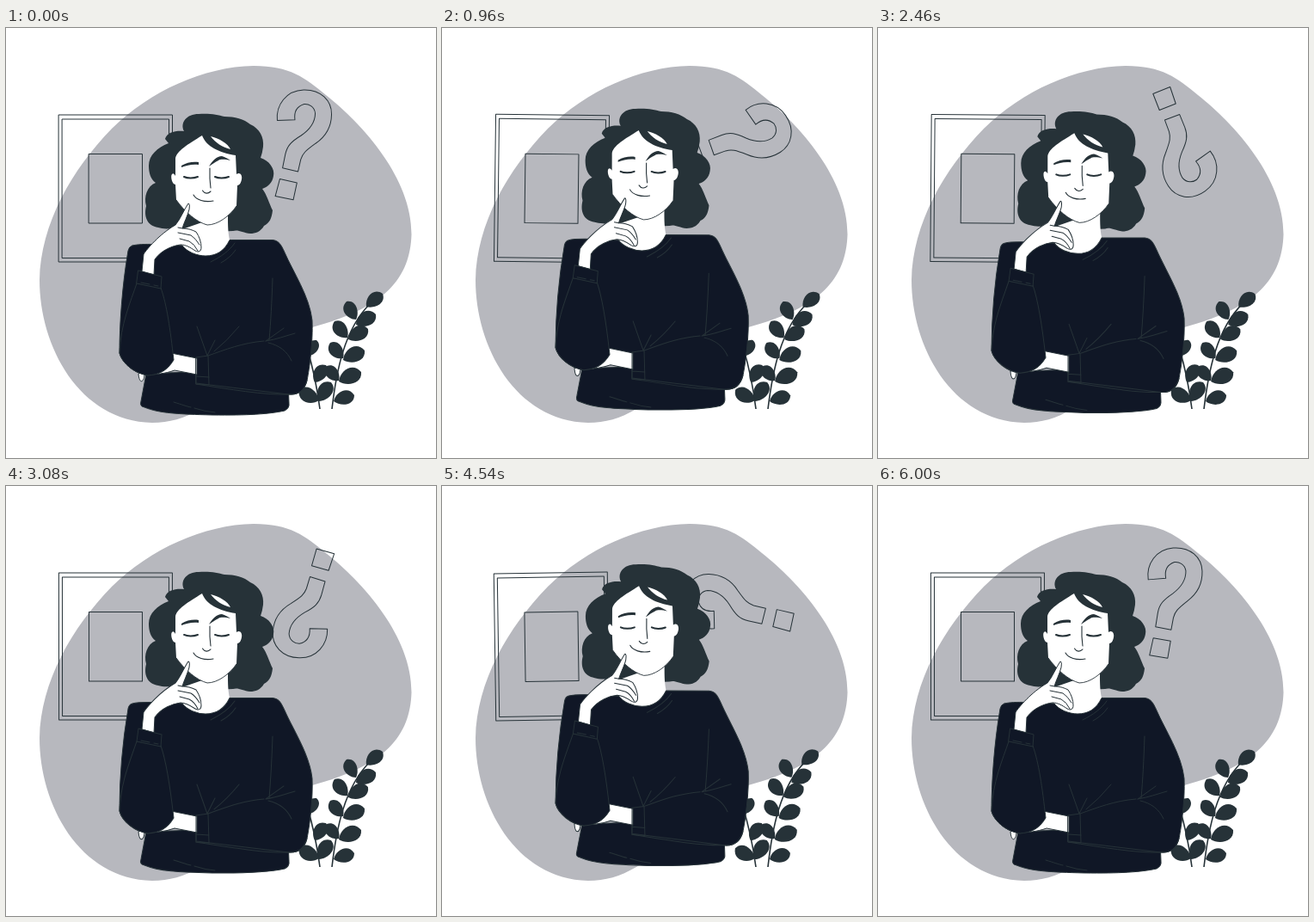
An HTML page with a canvas for the animation above (6.04 s loop, 500 by 500 pixels).

```html
<!DOCTYPE html>
<html lang="en">
<head>
<meta charset="utf-8">
<title>Thinking</title>
<style>
html, body { margin: 0; width: 100%; height: 100%; overflow: hidden; background: #fff; }
canvas { display: block; width: 500px; height: 500px; }
</style>
</head>
<body>
<canvas id="stage"></canvas>
<script>
const LOOP = 6040, STEPS = 145, TAU = Math.PI * 2;
const GREY = '#b7b8be', SLATE = '#263238', NAVY = '#101726', WHITE = '#fff';

const canvas = document.getElementById('stage');
const ctx = canvas.getContext('2d');
const ratio = window.devicePixelRatio || 1;
canvas.width = canvas.height = 500 * ratio;

const p = d => new Path2D(d);

const blob = p('M288 44C330 44 348 58 372 78C415 112 472 175 471.5 240C470 290 442 325 356 348C300 362 270 420 226 443C207 454 190 459 170 459C85 457 39 370 39 293C40 228 77 164 123 117C168 73 230 45 288 44Z');

const question = p('M322 163L325 147C327 137 332 132 343 125C353 118 359 109 359 99C358 91 351 88 346 88.5C338 91 334 97 335.5 107L315 108C313 90 325 73 345 72C365 71 378 84 378 100C378 117 370 127 360 134C348 143 345 146 343 153L340 167ZM319 176L339 180L335 200L314 196Z');

const hair = p('M207 120C202 110 210 100 224 100C237 99 246 101 254 103C266 103 277 106 284 112C295 117 300 127 299 138Q298 146 296 151C306 154 313 164 311 172C310 180 304 185 298 187C303 193 306 204 310 212C309 222 306 227 300 230C296 237 290 239 284 239C275 238 270 234 264 236L220 238L200 231C192 234 183 234 177 232C164 230 160 219 163 207C160 196 164 184 174 180C168 176 166 168 166 160C166 148 176 139 189 134L185 129C187 121 198 119 207 120Z');
const neck = p('M228 226L258 217C258 230 258 240 261 250C252 262 242 266 230 265C218 264 209 260 205 253L205 234Z');
const face = p('M197 152C198 143 212 135 228 125C233 138 248 145 267 148L268 170C272 167 275 171 274 176C273 181 271 183 269 183L268 207C260 219 246 229 234 229C222 226 208 214 198 200L197 182C193 182 191 172 193 170Q195 168 197 172Z');
const jaw = p('M198 200C208 214 222 226 234 229C246 229 260 219 268 207');
const parting = p('M238 126C247 128 258 134 261 141C252 139 243 133 238 126Z');
const brows = p('M204 160C210 156 218 155 224 156L224 159C216 158 210 160 204 162ZM236 161C240 154 245 149 251 149C255 150 258 152 261 154C256 153 250 152 247 154C243 156 240 158 236 161Z');
const eyes = p('M207 173C211 175 218 175 223 173M243 173C247 175 254 175 259 173');
const features = p('M237 163Q236.5 175 238 186M228.5 189C231 193 235 193 238 190M218 194C221 200 231 203 241 201');

const torso = p('M147 253C158 250 185 252 205 253C210 260 222 265 232 265C245 265 254 259 260 246.5L310 246.5C317 247 320 252 324 261C334 284 353 312 356 340C357 365 353 395 350 410C347 422 340 427 328 426L221 413L221 385L165 404C150 402 135 390 132 378C132 345 135 300 142 259Q143 254 147 253Z');
const hem = p('M163 402L157 434Q155 440 161 441C178 448 200 449 240 450C280 450.5 306 449 324 445Q330 442 329 436L328 410L221 400Z');
const wrist = p('M192 378L222 384L222 403L196 398C185 402 174 403 161 403C160 413 155 414 154 402L180 390Z');
const arm = p('M152 297L180 302C187 322 191 350 195 386C187 399 178 403 165 404C150 402 135 390 132 378C133 345 145 318 152 297Z');
const cuff = p('M154 282L181 289L180 303L152 297Z');
const cuffLines = p('M157 296L167 298M172 299L177 300M221 383L235 381L236 415L221 414ZM221 405L236 406');
const forearm = p('M235 381C255 374 275 366 300 364M221 414C260 420 300 427 328 426C340 427 347 422 350 410');
const creases = p('M310 291C309 320 308 340 306 363M302 364L323 349M302 364C315 362 325 358 336 355M305 366C318 369 327 376 332 387M222 347L234 381L243 363M242 376Q257 364 271 347M238 272C250 266 260 259 266 250M250 273Q261 267 267 258M195 435C205 438 210 440 215 441M219 442Q231 446 243 447');

const hand = p('M158 283L160 263C164 257 178 240 197 229C203 222 207 211 212 204Q214 204 213 211C211 219 207 226 205 233C212 233 217 235 221 237C225 243 227 249 227 255C227 260 224 261 220 259C214 255 209 252 203 252C194 253 181 258 173 269L172 287Z');
const fingers = p('M205 233L200 232M200 238L215 241Q220 244 225 252M202 245L213 248Q219 251 223 259');

const leafShape = p('M0 0C.22 -.4 .85 -.52 1 0C.85 .48 .22 .32 0 0Z');
const stems = p('M379 443C384 400 393 350 424 320M365 443C362 420 357 395 350 372');
// base x, base y, tip x, tip y
const leaves = [
  [419, 324, 438, 309], [407, 339, 396, 318], [407, 345, 430, 333],
  [397, 360, 382, 341], [398, 362, 421, 350], [392, 384, 377, 366],
  [392, 386, 417, 375], [387, 410, 373, 393], [387, 411, 413, 400],
  [381, 434, 405, 427], [364, 434, 378, 412], [359, 412, 372, 392],
  [364, 433, 341, 421], [353, 381, 361, 363]
];

function fill(path, color) {
  ctx.fillStyle = color;
  ctx.fill(path);
}

function line(path, width = 1) {
  ctx.strokeStyle = SLATE;
  ctx.lineWidth = width;
  ctx.stroke(path);
}

function shape(path, color, width = 1) {
  fill(path, color);
  line(path, width);
}

// Run draw() inside a rotation about (x, y), lifted by dy
function posed(x, y, angle, dy, draw) {
  ctx.save();
  ctx.translate(x, y + dy);
  ctx.rotate(angle);
  ctx.translate(-x, -y);
  draw();
  ctx.restore();
}

function drawPicture() {
  ctx.strokeStyle = SLATE;
  ctx.lineWidth = 1;
  ctx.strokeRect(61.5, 101, 132, 171);
  ctx.strokeRect(65.5, 106, 124, 161.5);
  ctx.strokeRect(96.5, 146.5, 62, 80.5);
}

function drawPlant() {
  line(stems, 1.6);
  for (const [x, y, tx, ty] of leaves) {
    const size = Math.hypot(tx - x, ty - y);
    ctx.save();
    ctx.translate(x, y);
    ctx.rotate(Math.atan2(ty - y, tx - x));
    ctx.scale(size, size);
    fill(leafShape, SLATE);
    ctx.restore();
  }
}

function drawWoman() {
  fill(hair, SLATE);
  fill(neck, WHITE);
  fill(face, WHITE);
  line(jaw, 0.9);
  fill(parting, WHITE);
  fill(brows, SLATE);
  line(eyes, 2);
  line(features, 1.1);
  shape(hem, NAVY);
  shape(torso, NAVY);
  shape(wrist, WHITE);
  shape(hand, WHITE);
  line(fingers);
  shape(arm, NAVY);
  shape(cuff, NAVY);
  line(cuffLines);
  line(forearm);
  line(creases);
}

function draw(phase) {
  const turn = phase * TAU;
  const sway = Math.sin(turn);
  const rise = (1 - Math.cos(2 * turn)) / 2;
  ctx.setTransform(ratio, 0, 0, ratio, 0, 0);
  ctx.fillStyle = WHITE;
  ctx.fillRect(0, 0, 500, 500);
  ctx.lineCap = ctx.lineJoin = 'round';
  fill(blob, GREY);
  posed(127.5, 186.5, sway * 0.0145, 0, drawPicture);
  posed(345.5, 136, turn + 0.015, 0, () => line(question));
  ctx.save();
  ctx.beginPath();
  ctx.rect(0, 0, 500, 443);
  ctx.clip();
  posed(372, 443, sway * 0.006, 0, drawPlant);
  ctx.restore();
  posed(240, 390, rise * 0.004, -8.6 * rise, drawWoman);
}

function tick() {
  const time = performance.now() % LOOP;
  const step = Math.floor(time / LOOP * STEPS + 0.05) % STEPS;
  draw(step / STEPS);
  requestAnimationFrame(tick);
}
tick();
</script>
</body>
</html>
```
